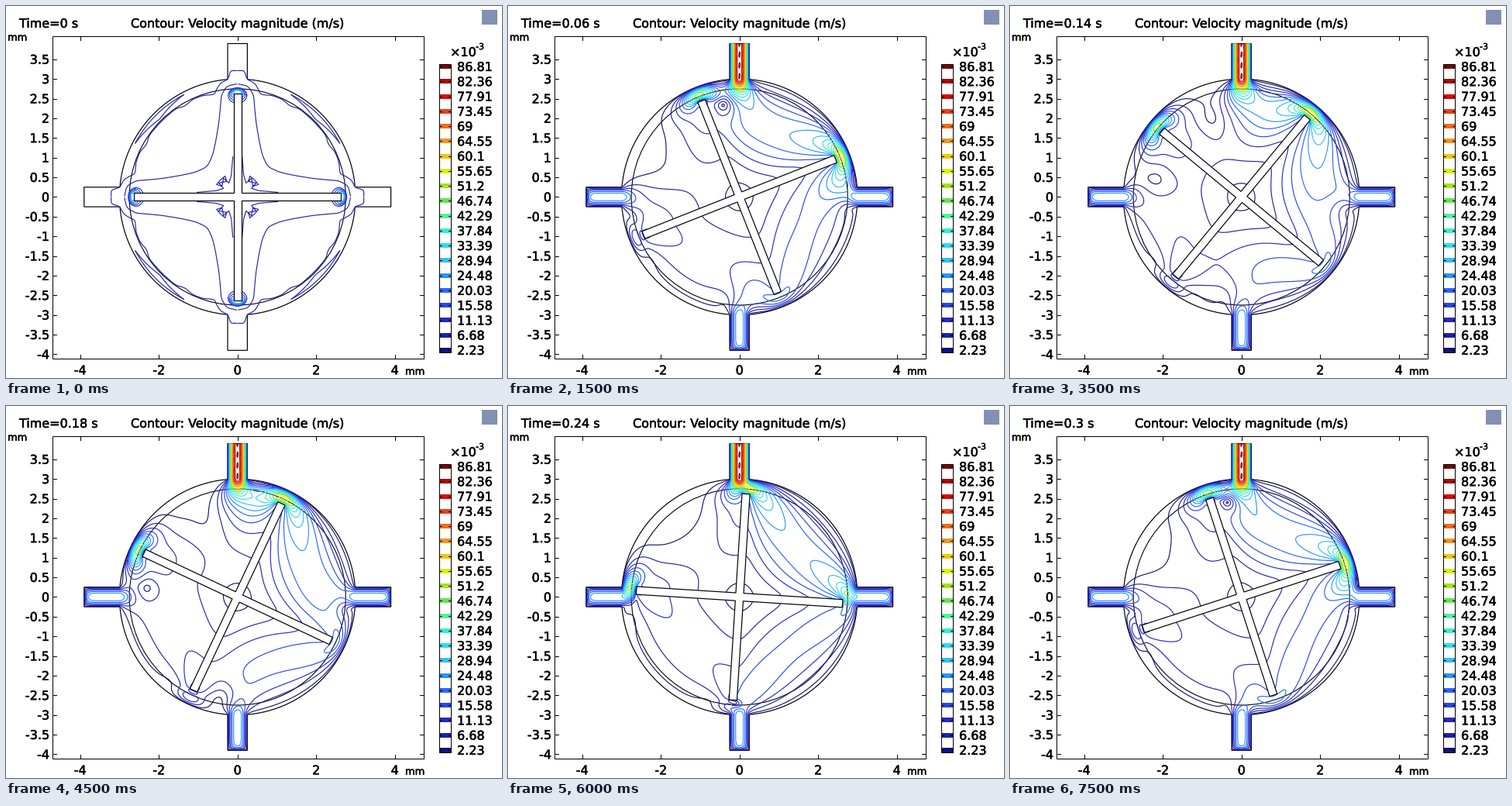
A matplotlib script for the animation above (8000 ms loop, 640 by 480 pixels).

```python
import numpy as np
import matplotlib.pyplot as plt
from matplotlib.animation import FuncAnimation
from matplotlib.patches import Circle, Polygon, Rectangle
from matplotlib.patheffects import withStroke

FRAMES, STEP = 16, 0.02              # frames, seconds of flow per frame
TURN = 2 * np.pi                     # rotor pose, rad/s counter-clockwise
SPIN = -2 * np.pi                    # wall speed of the blades in the flow model
R, R_IN, PIPE, END = 3.0, 2.75, 0.25, 3.9
HALF, REACH = 0.1, 2.625             # blade half width and length, mm
V_IN = 86.8                          # inlet peak speed, mm/s
FLOW = (V_IN / 3, -V_IN, V_IN / 3, V_IN / 3)   # right, top, left, bottom

CX, CY, SCALE = 298.7, 246.4, 50.75
PT = 0.9                             # points per pixel at 80 dpi
LEVELS = 2.2258 + 4.45175 * np.arange(20)
COLORS = ["#14147a", "#2020b0", "#2828c8", "#2846e6", "#2864ff", "#2896ff",
          "#32bef5", "#32dceb", "#3ceecd", "#5af0a0", "#64e650", "#a0e61e",
          "#dcf000", "#f0c800", "#f0961e", "#ee6e14", "#f03c14", "#dc0a0a",
          "#aa0a0a", "#780a0a"]


# ---- creeping flow around the rotor, solved in the rotor's own frame ----

M, NQ = 90, 120                      # rings, nodes per quadrant
N = 4 * NQ
R0 = 0.12
DR, DT = (R - R0) / M, 2 * np.pi / N
RINGS = R0 + DR * np.arange(M + 1)
THETA = DT * np.arange(N)
STIFF = 2e5


def blade_mask(r, th):
    x, y = np.abs(r * np.cos(th)), np.abs(r * np.sin(th))
    d = np.minimum(np.maximum(y - HALF, x - REACH),
                   np.maximum(x - HALF, y - REACH))
    return np.clip(-d / 0.04, 0, 1)


def wall_stream(th):
    """Stream function on the chamber wall at lab angle th."""
    th = (th + np.pi / 4) % (2 * np.pi) - np.pi / 4
    total = 0
    for q, v in enumerate(FLOW):
        x = np.clip(R * (th - q * np.pi / 2) / PIPE, -1, 1)
        total = total + v * PIPE * (x - x ** 3 / 3)
    return total


def solve_mode(m, wall, slip):
    """Block elimination for one four-fold symmetry class."""
    n, nb = NQ, M // 2
    kind = complex if m == 1 else float
    wall, slip = (wall, slip) if m == 1 else (wall.real, slip.real)
    eye = np.eye(n, dtype=kind)
    shift = np.eye(n, k=1, dtype=kind)
    shift[-1, 0] = (1, 1j, -1)[m]
    lap_t = (shift + shift.conj().T - 2 * eye) / DT ** 2
    diff = shift - eye
    diag = np.zeros((nb, 2 * n, 2 * n), kind)
    upper = np.zeros((nb, 2 * n, 2 * n), kind)
    rhs = np.zeros((nb, 2 * n, wall.shape[1]), kind)

    def part(a):
        return slice(n * (a % 2), n * (a % 2) + n)

    def add(a, b, mat):
        if a // 2 == b // 2:
            diag[a // 2][part(a), part(b)] += mat
        elif b // 2 == a // 2 + 1:
            upper[a // 2][part(a), part(b)] += mat

    for i in range(1, M + 1):
        r = RINGS[i]
        lo = (r - DR / 2) / (r * DR ** 2)
        up = (r + DR / 2) / (r * DR ** 2)
        centre = lap_t / r ** 2 - (lo + up) * eye
        weight = r * DR
        known = None
        if i == M:
            weight /= 2
            row = {M - 1: (lo + up) * eye}
            known = centre @ wall + up * slip
        else:
            row = {i - 1: lo * eye, i: centre}
            if i == M - 1:
                known = up * wall
            else:
                row[i + 1] = up * eye
        for a, ea in row.items():
            for b, eb in row.items():
                if b // 2 >= a // 2:
                    add(a, b, weight * (ea.conj().T @ eb))
            if known is not None:
                rhs[a // 2][part(a)] -= weight * (ea.conj().T @ known)

    # no deformation inside the blades
    th = THETA[:n]
    for i in range(M):
        p = STIFF * blade_mask(RINGS[i], th + DT / 2) * DR / (RINGS[i] * DT ** 2)
        add(i, i, diff.conj().T @ (p[:, None] * diff))
        if i < M - 1:
            mid = RINGS[i] + DR / 2
            p = np.diag(STIFF * blade_mask(mid, th) * mid / DR)
            add(i, i, p)
            add(i + 1, i + 1, p)
            add(i, i + 1, -p)
            add(i + 1, i, -p)

    steps = []
    for k in range(nb - 1):
        s = np.linalg.solve(diag[k], np.hstack([upper[k], rhs[k]]))
        steps.append(s)
        coupled = upper[k].conj().T @ s
        diag[k + 1] -= coupled[:, :2 * n]
        rhs[k + 1] -= coupled[:, 2 * n:]
    x = np.zeros_like(rhs)
    x[-1] = np.linalg.solve(diag[-1], rhs[-1])
    for k in range(nb - 2, -1, -1):
        x[k] = steps[k][:, 2 * n:] - steps[k][:, :2 * n] @ x[k + 1]
    return x.reshape(M, n, -1)


def speed_fields(angles):
    wall = wall_stream(THETA[:, None] + angles[None, :])
    slip = np.full_like(wall, 2 * DR * SPIN * R)
    wall_m = np.fft.fft(wall.reshape(4, NQ, -1), axis=0)
    slip_m = np.fft.fft(slip.reshape(4, NQ, -1), axis=0)
    modes = [solve_mode(m, wall_m[m], slip_m[m]) for m in range(3)]
    modes.append(modes[1].conj())
    phi = np.fft.ifft(np.array(modes), axis=0).real
    phi = phi.transpose(1, 0, 2, 3).reshape(M, N, -1)
    phi = np.concatenate([phi, wall[None]])
    r = RINGS[:, None, None]
    radial = (np.roll(phi, -1, 1) - np.roll(phi, 1, 1)) / (2 * DT * r)
    around = SPIN * r - np.gradient(phi, DR, axis=0)
    around[-1] = 0
    speed = np.hypot(radial, around)
    return np.concatenate([speed, speed[:, :1]], axis=1)


ANGLES = TURN * STEP * np.arange(FRAMES)
SPEED = speed_fields(ANGLES[1:])


# ---- drawing helpers, all in stage pixels ----

fig = plt.figure(figsize=(8, 6), dpi=80, facecolor="white")
ax = fig.add_axes([0, 0, 1, 1])
ax.set_xlim(0, 640)
ax.set_ylim(480, 0)
ax.axis("off")


def px(x, y):
    return CX + SCALE * x, CY - SCALE * y


def turn(x, y, a):
    return x * np.cos(a) - y * np.sin(a), x * np.sin(a) + y * np.cos(a)


def label(x, y, s, size=16, ha="left"):
    return ax.text(x, y + 0.365 * size, s, fontsize=size * PT, ha=ha,
                   va="baseline", family="DejaVu Sans", zorder=9,
                   path_effects=[withStroke(linewidth=0.5 * PT,
                                            foreground="black")])


def line(x, y, color="black", width=1.0, z=5):
    return ax.plot(x, y, color=color, lw=width * PT, zorder=z)[0]


def contours(x, y, values):
    return ax.contour(x, y, values, levels=LEVELS, colors=COLORS,
                      linewidths=1.15 * PT, zorder=3)


# axes box, ticks and labels
L, T, RT, B = 59.5, 38.5, 538.5, 454.5
ax.add_patch(Rectangle((L, T), RT - L, B - T, fill=False, lw=PT, zorder=6))
for v in np.arange(-4, 3.6, 0.5):
    y = px(0, v)[1]
    line([L, L + 5], [y, y])
    line([RT - 5, RT], [y, y])
    label(56, y, f"{v:g}", ha="right")
for v in range(-4, 5, 2):
    x = px(v, 0)[0]
    line([x, x], [B, B - 5])
    line([x, x], [T, T + 5])
    label(x, 469.5, f"{v}", ha="center")
label(2, 40, "mm", 13)
label(515, 471, "mm", 13)
label(161, 22, "Contour: Velocity magnitude (m/s)")
clock = label(17, 22, "")
ax.add_patch(Rectangle((614, 5), 20, 19, color="#8290b4", lw=0))

# colour legend
label(573, 59, "×10")
label(606, 52, "-3", 11)
for i, (v, c) in enumerate(zip(LEVELS, COLORS)):
    y = 444 - 19.26 * i
    ax.add_patch(Rectangle((559, y - 3), 15, 6, color=c, lw=0))
    line([559, 562], [y, y])
    line([571, 574], [y, y])
    label(582, y, f"{v:.2f}".rstrip("0").rstrip("."))
ax.add_patch(Rectangle((559, 75), 15, 372, fill=False, lw=PT, zorder=6))

# housing
gap = np.arcsin(PIPE / R)
arc = np.linspace(gap, np.pi / 2 - gap, 80)
side_x = np.concatenate([[END, END], R * np.cos(arc)])
side_y = np.concatenate([[-PIPE, PIPE], R * np.sin(arc)])
shell = np.hstack([turn(side_x, side_y, q * np.pi / 2) for q in range(4)])
ax.add_patch(Polygon(np.transpose(px(*shell)), fill=False, lw=1.2 * PT,
                     zorder=2))
ax.add_patch(Circle((CX, CY), R_IN * SCALE, fill=False, lw=1.1 * PT, zorder=2))

# rotor
cross = np.hstack([turn(np.array([REACH, REACH, HALF]),
                        np.array([-HALF, HALF, HALF]), q * np.pi / 2)
                   for q in range(4)])
rotor = ax.add_patch(Polygon(np.transpose(px(*cross)), facecolor="white",
                             edgecolor="black", lw=1.2 * PT, zorder=6))

# steady flow in the pipes
running = []
along, across = np.meshgrid(np.linspace(R * np.cos(gap), END, 90),
                            np.linspace(-PIPE, PIPE, 61))
for q, v in enumerate(FLOW):
    speed = abs(v) * (1 - (across / PIPE) ** 2)
    if v > 0:
        speed = speed * (1 - np.exp((along - END) / 0.06))
    else:
        speed = speed * (1 + 0.004 * np.sin(23 * along + 40 * across))
    running.append(contours(*px(*turn(along, across, q * np.pi / 2)), speed))


# rest state: only the first stir of the blades
def smooth(pts):
    pts = np.array(pts, float)
    t = np.linspace(0, len(pts) - 1, 12 * len(pts))

    def ease(v):
        v = np.pad(np.interp(t, np.arange(len(pts)), v), 4, mode="edge")
        return np.convolve(v, np.ones(9) / 9, "valid")
    return ease(pts[:, 0]), ease(pts[:, 1])


def mirrored(half):
    return half + [(y, x) for x, y in half[-2::-1]]


resting = []


def four(x, y, color):
    for q in range(4):
        tx, ty = turn(np.asarray(x, float), np.asarray(y, float), q * np.pi / 2)
        resting.append(line(CX + tx, CY - ty, color, 1.15, 3))


four(*smooth(mirrored([(0, 146), (14, 143), (21, 131), (22, 116), (24, 96),
                       (28, 72), (32, 54), (39, 39)])), COLORS[1])
four(*smooth(mirrored([(0, 163), (9, 163), (12, 152), (22, 147), (27, 139),
                       (30, 132), (45, 131), (58, 126), (68, 117), (80, 114),
                       (98, 98)])), COLORS[1])
four(*zip(*mirrored([(6, 52), (8, 28), (11, 18), (18, 24), (20, 14),
                     (27, 16), (22, 22)])), COLORS[1])
bend = np.linspace(-1, 1, 40)
for depth in (0, 7):
    rad = 149 - depth * (1 - np.abs(bend))
    ang = np.pi / 4 + 0.3 * bend
    four(rad * np.cos(ang), rad * np.sin(ang), COLORS[1])
loop = np.linspace(0, 2 * np.pi, 60)
for i in range(5):
    four((12 - 1.7 * i) * np.cos(loop),
         131 + i + (10 - 1.9 * i) * np.sin(loop), COLORS[2 + i])

# ---- animation ----

ring_r, ring_t = np.meshgrid(RINGS, np.append(THETA, 2 * np.pi), indexing="ij")
current = []


def update(k):
    while current:
        current.pop().remove()
    a = ANGLES[k]
    clock.set_text(f"Time={k * STEP:.2g} s")
    rotor.set_xy(np.transpose(px(*turn(*cross, a))))
    for art in running:
        art.set_visible(k > 0)
    for art in resting:
        art.set_visible(k == 0)
    if k:
        x, y = px(ring_r * np.cos(ring_t + a), ring_r * np.sin(ring_t + a))
        current.append(contours(x, y, SPEED[:, :, k - 1]))
    return []


anim = FuncAnimation(fig, update, frames=FRAMES, interval=500, repeat=True,
                     repeat_delay=0, blit=False)
plt.show()
```
